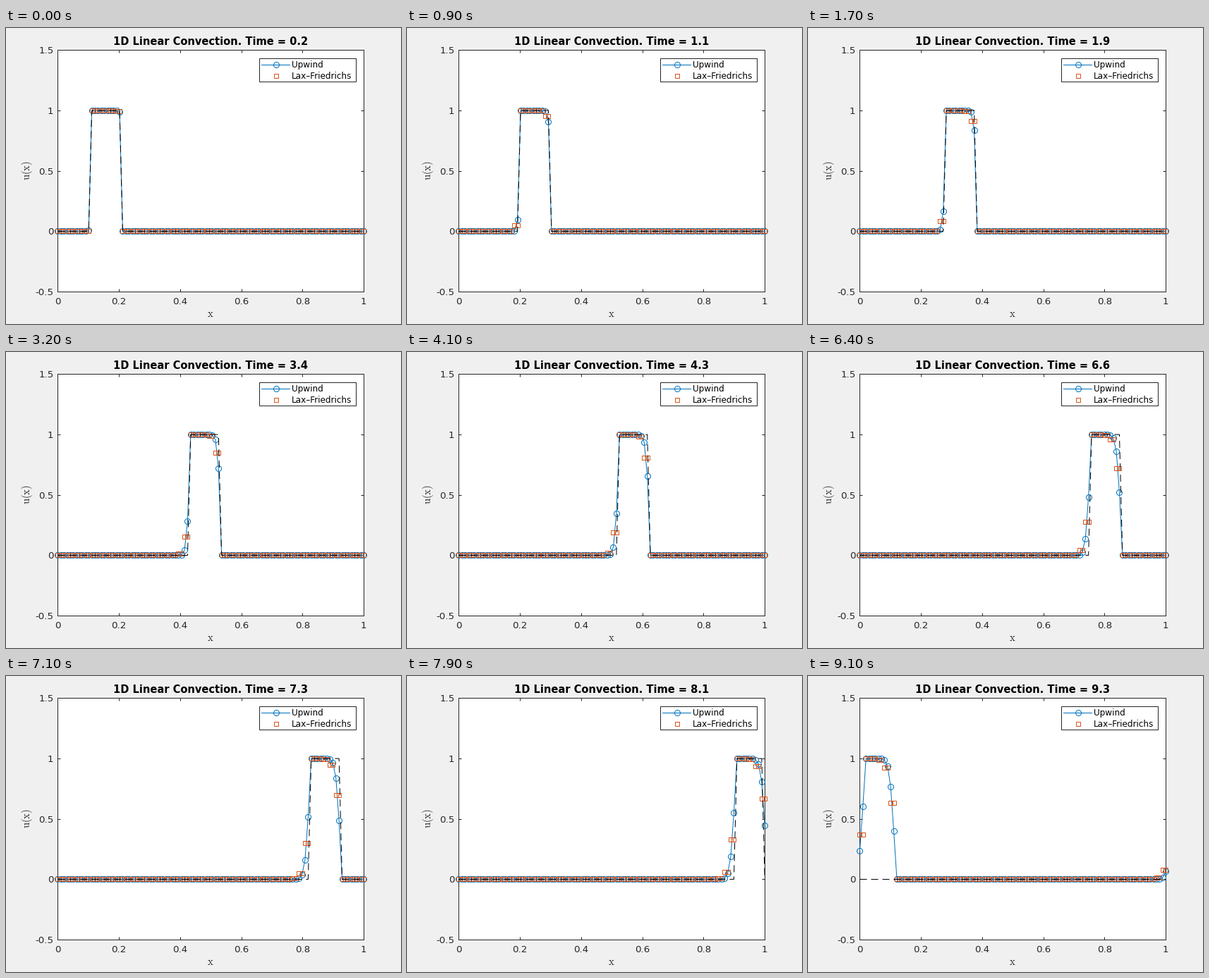
These frames come from a looping animation (560x420 px, 9200 ms). A matplotlib script:

```python
import matplotlib.pyplot as plt
import numpy as np
from matplotlib.animation import FuncAnimation
from matplotlib.patches import Rectangle

W, H, DPI = 560, 420, 100
LEFT, RIGHT, TOP, BOTTOM = 73.4, 507.2, 31.4, 374.1
FRAMES, INTERVAL = 92, 100
BLUE, ORANGE, INK, PAPER = "#0072BD", "#D95319", "#262626", "#F0F0F0"

# Linear advection on a periodic grid
POINTS, SPEED, DT = 100, 0.1, 0.1
x = np.linspace(0, 1, POINTS)
cfl = SPEED * DT / (x[1] - x[0])


def pulse(pos):
    return ((pos >= 0.1) & (pos <= 0.2)).astype(float)


def upwind_step(u):
    return u - cfl * (u - np.roll(u, 1))


def lax_step(u):
    ahead, behind = np.roll(u, -1), np.roll(u, 1)
    return 0.5 * (ahead + behind) - 0.5 * cfl * (ahead - behind)


def solve():
    states = []
    up = lax = pulse(x)
    t = 0.0
    for _ in range(FRAMES):
        up, lax = upwind_step(up), lax_step(lax)
        t += DT
        states.append((up, lax, pulse(x - SPEED * t)))
    return states


def pt(px):
    return px * 72 / DPI


plt.rcParams["font.family"] = "DejaVu Sans"
plt.rcParams["lines.linewidth"] = pt(1)
fig = plt.figure(figsize=(W / DPI, H / DPI), dpi=DPI, facecolor=PAPER)
ax = fig.add_axes([LEFT / W, 1 - BOTTOM / H,
                   (RIGHT - LEFT) / W, (BOTTOM - TOP) / H])
ax.set(xlim=(0, 1), ylim=(-0.5, 1.5),
       xticks=np.arange(6) / 5, yticks=np.arange(-1, 4) / 2)
ax.tick_params(direction="in", length=pt(4.3), width=pt(1), color=INK,
               top=True, right=True, labelbottom=False, labelleft=False)
for spine in ax.spines.values():
    spine.set(linewidth=pt(1), edgecolor=INK)


def label(px, py, text, size, color=INK, **kw):
    kw = {"ha": "center", "va": "baseline", **kw}
    return fig.text(px / W, 1 - py / H, text, fontsize=pt(size), color=color, **kw)


for v in ax.get_xticks():
    label(LEFT + v * (RIGHT - LEFT), 392, f"{v:g}", 13.33)
for v in ax.get_yticks():
    y = BOTTOM - (v + 0.5) / 2 * (BOTTOM - TOP)
    label(67.5, y + 5, f"{v:g}", 13.33, ha="right")
label(290, 410, r"$\mathrm{x}$", 14.67, math_fontfamily="cm")
label(34, 202, r"$\mathrm{u(x)}$", 14.67, math_fontfamily="cm",
      rotation=90, rotation_mode="anchor")
title = label(290, 24, "", 14.67, "black", weight="bold")

circle = dict(color=BLUE, marker="o", markersize=pt(8), mfc="none", mew=pt(1))
square = dict(color=ORANGE, marker="s", markersize=pt(6), mfc="none",
              mew=pt(1), linestyle="none")
up_line, = ax.plot(x, x, clip_on=False, zorder=3, **circle)
lax_line, = ax.plot(x, x, clip_on=False, zorder=4, **square)
exact_line, = ax.plot(x, x, color="black", linestyle=(0, (10, 6)),
                      clip_on=False, zorder=5)

# Legend, laid out in stage pixels
key = fig.add_axes([0, 0, 1, 1])
key.set(xlim=(0, W), ylim=(H, 0))
key.axis("off")
key.add_patch(Rectangle((358.5, 42.5), 137, 33, fc="white", ec=INK, lw=pt(1)))
key.plot([362, 382.5, 402], [51.5] * 3, markevery=[1], **circle)
key.plot([382.5], [67.5], **square)
label(405, 56, "Upwind", 12, "black", ha="left")
label(405, 72, "Lax\u2013Friedrichs", 12, "black", ha="left")

states = solve()


def draw(frame):
    artists = up_line, lax_line, exact_line
    for line, values in zip(artists, states[frame]):
        line.set_ydata(values)
    title.set_text(f"1D Linear Convection. Time = {0.2 + DT * frame:.1f}")
    return *artists, title


anim = FuncAnimation(fig, draw, frames=FRAMES, interval=INTERVAL,
                     repeat=True, repeat_delay=0)
plt.show()
```
